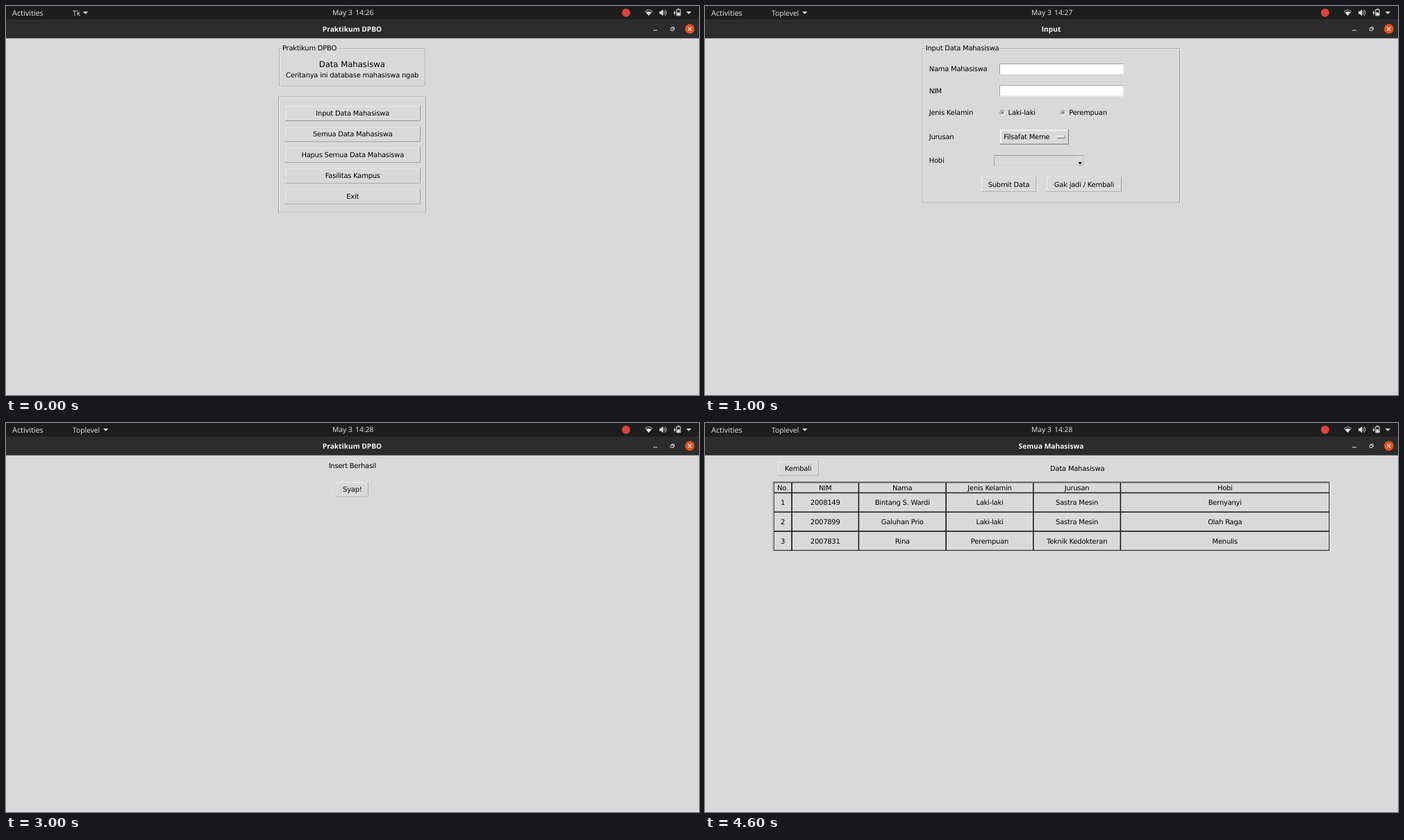
Write an HTML page that moves like this. It is 998 px wide and 561 px high and loops after 5 s.

```html
<!DOCTYPE html>
<html lang="id">
<head>
<meta charset="utf-8">
<title>Data Mahasiswa</title>
<style>
  html, body { margin: 0; width: 100%; height: 100%; overflow: hidden; background: #d9d9d9; }
  svg { display: block; width: 998px; height: 561px; }
  text {
    font: 9.95px "DejaVu Sans", sans-serif; letter-spacing: -.22px;
    white-space: pre; text-rendering: geometricPrecision;
  }
  .big { font-size: 11.65px; letter-spacing: 0; }
  .bar { font: 10.3px "Open Sans", "Noto Sans", sans-serif; letter-spacing: 0; fill: #e8e8e8; }
  .wide { font-size: 10.9px; }
  .title { font: bold 10.2px "Open Sans", "Noto Sans", sans-serif; letter-spacing: 0; fill: #f4f4f4; }
</style>
</head>
<body>
<svg id="stage" viewBox="0 0 998 561"></svg>
<script>
const BG = '#d9d9d9', DARK = '#828282', LIGHT = '#fff', PX = 0.73;

const rect = (x, y, w, h, fill) =>
  `<rect x="${x}" y="${y}" width="${w}" height="${h}" fill="${fill}"/>`;
const path = (d, attrs = '') => `<path d="${d}" ${attrs}/>`;
const text = (x, y, s, cls = '', attrs = '') =>
  `<text x="${x}" y="${y}" class="${cls}" ${attrs}>${s}</text>`;
const mid = (x, y, s, cls) => text(x, y, s, cls, 'text-anchor="middle"');

// Tk-style reliefs
const bevel = (x, y, w, h, b, topLeft, bottomRight, fill) =>
  rect(x, y, w, h, bottomRight) +
  rect(x, y, w - b, h - b, topLeft) +
  rect(x + b, y + b, w - 2 * b, h - 2 * b, fill);
const raised = (x, y, w, h, b = PX, fill = BG) => bevel(x, y, w, h, b, LIGHT, DARK, fill);
const sunken = (x, y, w, h, fill = BG, b = PX) => bevel(x, y, w, h, b, DARK, LIGHT, fill);
const groove = (x, y, w, h) =>
  sunken(x, y, w, h) + raised(x + PX, y + PX, w - 2 * PX, h - 2 * PX);

const labelFrame = (x, y, w, h, label, labelW) =>
  groove(x, y, w, h) + rect(x + 4.4, y - 4, labelW, 10, BG) + text(x + 5, y + 3.4, label);
const button = (x, y, w, h, label, fill) =>
  raised(x, y, w, h, PX, fill) + mid(x + w / 2, y + h / 2 + 3.4, label);
const caret = (x, y) => path(`M${x} ${y}h7.4l-3.7 3.8z`, 'fill="#e8e8e8"');

function header(app, caretX, clock, title) {
  return text(96, 13.5, app, 'bar') + caret(caretX, 8) +
    text(470, 13.3, 'May 3', 'bar') + text(503, 13.3, clock, 'bar') +
    mid(498.5, 37.2, title, 'title');
}

const chrome =
  rect(0, 0, 998, 561, BG) + rect(0, 0, 998, 20, '#1d1d1d') +
  rect(0, 20, 998, 26.6, '#2c2c2c') + rect(0, 19.6, 998, 0.8, '#353535') +
  text(9, 13.5, 'Activities', 'bar wide') +
  '<circle cx="893" cy="9.7" r="6" fill="#dc4437"/>' +
  path('M920.6 7.6Q925.6 3.6 930.6 7.6L925.6 13.6Z', 'fill="none" stroke="#e8e8e8" stroke-width=".8"') +
  path('M922 9.3Q925.6 6.8 929.2 9.3L925.6 13.8Z', 'fill="#e8e8e8"') +
  path('M941 7.8h2.2l3-3v9.6l-3-3H941z', 'fill="#e8e8e8"') +
  path('M947.4 7.4q1.6 2.2 0 4.4M949 5.5q3.4 4.1 0 8.2', 'fill="none" stroke="#e8e8e8"') +
  path('M963.6 5.8l-2.4 4.4h1.6l-.6 3.8 2.6-4.8h-1.7z', 'fill="#e8e8e8"') +
  path('M965.8 5.2h5.4v8.6h-5.4zM967.3 4.2h2.4', 'fill="none" stroke="#e8e8e8"') +
  rect(966.6, 9.4, 3.8, 3.8, '#e8e8e8') + caret(979.6, 8) +
  rect(932, 34.5, 6, 1, '#e8e8e8') +
  path('M957.3 32h3.6v3.6h-3.6zM958.8 32v-1.6h3.6v3.7h-1.5', 'fill="none" stroke="#dedede" stroke-width=".9"') +
  '<circle cx="984.8" cy="33" r="6.9" fill="#e4511f"/>' +
  path('M982.2 30.4l5.2 5.2m0-5.2l-5.2 5.2', 'stroke="#fff" stroke-width="1.1"');

function menu() {
  const items = ['Input Data Mahasiswa', 'Semua Data Mahasiswa', 'Hapus Semua Data Mahasiswa',
    'Fasilitas Kampus', 'Exit'];
  return header('Tk', 110.8, '14:26', 'Praktikum DPBO') +
    labelFrame(393, 61, 211, 55, 'Praktikum DPBO', 80.5) +
    mid(498.3, 87.6, 'Data Mahasiswa', 'big') +
    mid(498.6, 103, 'Ceritanya ini database mahasiswa ngab') +
    groove(392.3, 130.7, 213, 167.3) +
    items.map((s, i) => button(401.8, 143.8 + 29.95 * i, 194.9, 21.9, s)).join('');
}

function radio(x, label, fill, dot) {
  const y = 153.8, r = 3.5;
  const arc = (sweep, color) => path(`M${x - 2.5} ${y + 2.5}A${r} ${r} 0 0 ${sweep} ${x + 2.5} ${y - 2.5}`,
    `fill="none" stroke="${color}" stroke-width=".9"`);
  return `<circle cx="${x}" cy="${y}" r="${r}" fill="${fill}"/>` + arc(0, LIGHT) + arc(1, DARK) +
    (dot ? `<circle cx="${x}" cy="${y}" r="1.6" fill="${dot}"/>` : '') + text(x + 8.3, 157, label);
}

function form(clock, v) {
  const labels = [['Nama Mahasiswa', 94.3], ['NIM', 125.6], ['Jenis Kelamin', 157],
    ['Jurusan', 192], ['Hobi', 226.4]];
  return header('Toplevel', 140, clock, 'Input') +
    labelFrame(312.7, 61, 371.8, 223, 'Input Data Mahasiswa', 107) +
    labels.map(([s, y]) => text(322.7, y, s)).join('') +
    sunken(424, 83, 179, 16, LIGHT) + text(425.6, 94.3, v.name) +
    sunken(424, 114.4, 179, 16, LIGHT) + text(425.6, 125.6, v.nim) +
    radio(428.3, 'Laki-laki', v.radioFill, v.dots[0]) +
    radio(516, 'Perempuan', v.radioFill, v.dots[1]) +
    raised(425, 178.2, v.menuW, 21.6, 1.46) + text(430.2, 192, v.major) +
    raised(425 + v.menuW - 17, 186.6, 11.4, 4.6, 1.3) +
    sunken(416.3, 215, 129.7, 16.2) + raised(535.8, 216.4, 9.4, 13.6) +
    path('M537.2 225h6l-3 3.4z') +
    (v.hobby ? rect(417.3, 216.3, 38.7, 13.6, '#4a6984') +
      text(417.9, 226.4, v.hobby, '', `fill="${BG}"`) : '') +
    button(398, 246.3, 79, 21.7, 'Submit Data', v.submitFill) +
    button(492.2, 246.3, 107.4, 21.7, 'Gak jadi / Kembali');
}

const empty = { name: '', nim: '', radioFill: '#d0d0d0', dots: ['#777', '#777'],
  menuW: 99, major: 'Filsafat Meme', hobby: '', submitFill: BG };
const filled = { name: 'Rina', nim: '2007831', radioFill: LIGHT, dots: ['', '#000'],
  menuW: 120, major: 'Teknik Kedokteran', hobby: 'Menulis', submitFill: '#ececec' };

const success = () => header('Toplevel', 140, '14:28', 'Praktikum DPBO') +
  mid(498.8, 64.8, 'Insert Berhasil') + button(475.7, 85, 46.3, 21.3, 'Syap!');

function table() {
  const xs = [98.9, 125, 221.4, 347.1, 472.8, 598.4, 899.2];
  const ys = [85.6, 100.6, 128.4, 156.2, 184];
  const rows = [
    ['No.', 'NIM', 'Nama', 'Jenis Kelamin', 'Jurusan', 'Hobi'],
    ['1', '2008149', 'Bintang S. Wardi', 'Laki-laki', 'Sastra Mesin', 'Bernyanyi'],
    ['2', '2007899', 'Galuhan Prio', 'Laki-laki', 'Sastra Mesin', 'Olah Raga'],
    ['3', '2007831', 'Rina', 'Perempuan', 'Teknik Kedokteran', 'Menulis']];
  // Each cell has its own thin border, so inner lines come out double.
  const cell = (s, r, c) => {
    const x = xs[c], y = ys[r], w = xs[c + 1] - x, h = ys[r + 1] - y;
    return bevel(x, y, w, h, PX, '#000', '#000', BG) + mid(x + w / 2, y + h / 2 + 3.4, s);
  };
  return header('Toplevel', 140, '14:28', 'Semua Mahasiswa') +
    button(104.7, 54.7, 58.8, 21.4, 'Kembali') + mid(536.2, 68.6, 'Data Mahasiswa') +
    groove(97.4, 84.1, 803.3, 101.4) +
    rows.map((row, r) => row.map((s, c) => cell(s, r, c)).join('')).join('');
}

const scenes = [menu(), form('14:27', empty), form('14:28', filled), success(), table()];
const stage = document.getElementById('stage');
stage.innerHTML = chrome + scenes.map(s => `<g class="scene">${s}</g>`).join('');
const groups = [...stage.querySelectorAll('.scene')];

function draw() {
  const now = Math.floor(performance.now() % 5000 / 1000);
  groups.forEach((g, i) => g.style.display = i === now ? '' : 'none');
  requestAnimationFrame(draw);
}
draw();
</script>
</body>
</html>
```
